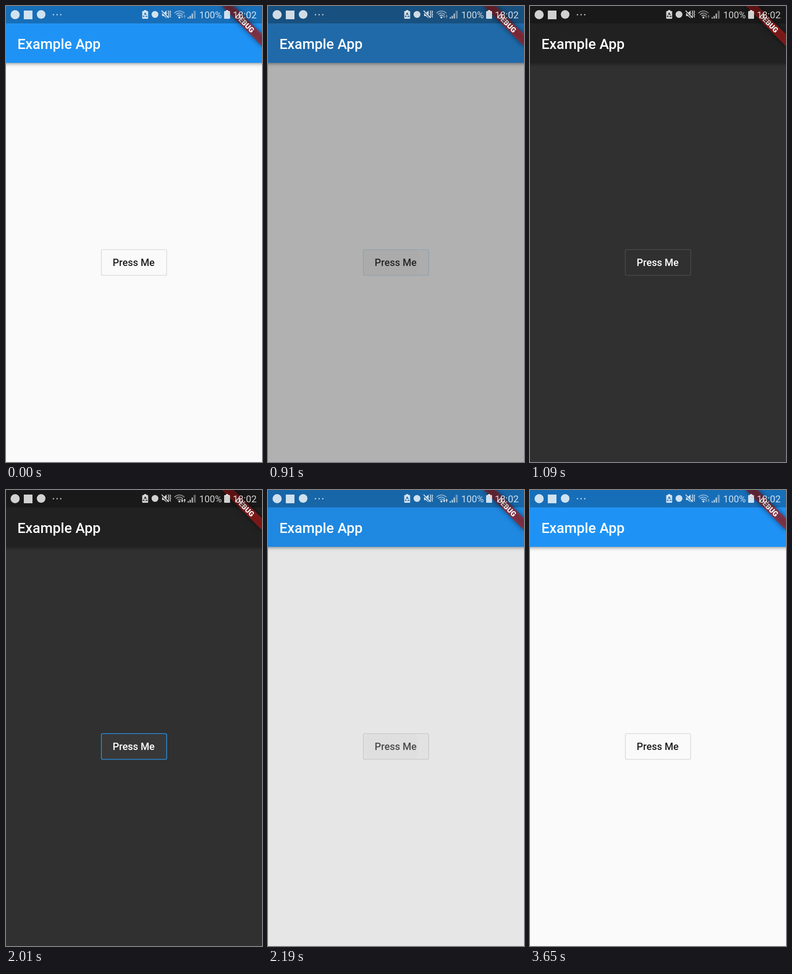
Write an HTML page with a canvas that moves like this. It is 561 px wide and 998 px high and loops after 4750 ms.

```html
<!DOCTYPE html>
<html lang="en">
<head>
<meta charset="utf-8">
<title>Theme toggle</title>
<style>
  html, body { margin: 0; width: 100%; height: 100%; overflow: hidden; background: #fafafa; }
  canvas { display: block; width: 100vw; height: 100vh; }
</style>
</head>
<body>
<canvas id="stage" width="561" height="998"></canvas>
<script>
const W = 561, H = 998, LOOP = 4750;
const ctx = document.getElementById('stage').getContext('2d');

// The screen is only refreshed at these moments.
const TICKS = [0, 640, 730, 820, 910, 1000, 1090, 1190, 1280, 1640,
  1910, 2010, 2100, 2190, 2280, 2370, 3650];
const PRESSES = [
  { down: 590, splash: 700, up: 800 },
  { down: 1870, splash: 1990, up: 2010 }
];
const LIGHT = { page: [250, 250, 250], bar: [31, 147, 245] };
const DARK = { page: [48, 48, 48], bar: [33, 33, 33] };
const BUTTON = { x: 208.8, y: 533.2, w: 143.4, h: 56.3, r: 3.2 };

const clamp = v => Math.max(0, Math.min(1, v));
const lerp = (a, b, f) => a + (b - a) * f;
const mix = (a, b, f) => a.map((v, i) => lerp(v, b[i], f));
const rgba = (c, a = 1) => `rgba(${c.map(Math.round).join(',')},${a})`;
const grey = (v, a = 1) => rgba([v, v, v], a);

function rect(x, y, w, h, color) {
  ctx.fillStyle = color;
  ctx.fillRect(x, y, w, h);
}

function disc(x, y, r, color) {
  ctx.fillStyle = color;
  ctx.beginPath();
  ctx.arc(x, y, r, 0, 7);
  ctx.fill();
}

function poly(points, color) {
  ctx.fillStyle = color;
  ctx.beginPath();
  points.forEach(([x, y]) => ctx.lineTo(x, y));
  ctx.closePath();
  ctx.fill();
}

function line(points, color, width) {
  ctx.strokeStyle = color;
  ctx.lineWidth = width;
  ctx.beginPath();
  points.forEach(([x, y]) => ctx.lineTo(x, y));
  ctx.stroke();
}

function text(label, x, y, size, weight, color, align = 'left') {
  ctx.font = `${weight} ${size}px Roboto, sans-serif`;
  ctx.textAlign = align;
  ctx.fillStyle = color;
  ctx.fillText(label, x, y);
}

function buttonPath() {
  ctx.beginPath();
  ctx.roundRect(BUTTON.x, BUTTON.y, BUTTON.w, BUTTON.h, BUTTON.r);
}

function drawAppBar(color) {
  ctx.save();
  ctx.shadowColor = 'rgba(0,0,0,.36)';
  ctx.shadowBlur = 7;
  ctx.shadowOffsetY = 2;
  rect(-20, 0, W + 40, 124.5, rgba(color));
  ctx.restore();
  text('Example App', 25, 93.5, 31.17, 500, '#fff');
}

function drawButton(t, dark) {
  const ink = 255 * dark;
  let border = 0;
  ctx.save();
  buttonPath();
  ctx.clip();
  for (const p of PRESSES) {
    const on = clamp((t - p.down) / 150);
    const fill = on * (1 - clamp((t - p.up) / 220));
    border += on * (1 - clamp((t - p.up) / 130));
    if (!fill) continue;
    rect(BUTTON.x, BUTTON.y, BUTTON.w, BUTTON.h, grey(ink, fill * lerp(.12, .04, dark)));
    if (t > p.splash) disc(270, 561, (t - p.splash) * .3, grey(ink, fill * .06));
  }
  ctx.restore();

  buttonPath();
  ctx.lineWidth = 1.6;
  ctx.strokeStyle = grey(ink, .13);
  ctx.stroke();
  ctx.strokeStyle = rgba([33, 150, 243], border);
  ctx.stroke();

  const tone = Math.pow(dark, 2.5);
  // The label lags behind the page in both directions.
  const label = t < 1500 ? tone : 1 - Math.pow(1 - dark, 2.5);
  text('Press Me', 279.8, 569, 21.82, 500, grey(255 * label, lerp(.87, 1, label)), 'center');
}

function drawRibbon() {
  const far = 2000;
  ctx.save();
  ctx.translate(W - far, 0);
  ctx.rotate(Math.PI / 4);
  ctx.shadowColor = 'rgba(0,0,0,.5)';
  ctx.shadowBlur = 12;
  ctx.shadowOffsetX = far;
  rect(-62.3, 43.6, 124.6, 18.7, '#000');
  ctx.restore();

  ctx.save();
  ctx.translate(W, 0);
  ctx.rotate(Math.PI / 4);
  rect(-62.3, 43.6, 124.6, 18.7, 'rgba(183,28,28,.627)');
  text('DEBUG', 0, 58.7, 15.9, 900, '#fff', 'center');
  ctx.restore();
}

function drawBattery(x, color) {
  rect(x + 4, 9, 5, 3, color);
  ctx.beginPath();
  ctx.roundRect(x, 11, 13, 17, 1.5);
  ctx.fill();
}

function drawMute(color, back) {
  poly([[342, 15], [346, 15], [352, 10], [352, 27], [346, 22], [342, 22]], color);
  line([[340, 10], [356, 27]], back, 4);
  line([[341, 10], [356, 26]], color, 2);
  for (const x of [355, 359]) {
    line([[x, 10], [x + 2, 13], [x, 16], [x + 2, 19], [x, 22], [x + 2, 25]], color, 1.6);
  }
}

function drawWifi(t) {
  const weak = t >= 1640 && t < 3650;
  [[5.5, weak ? .5 : .7], [10, .55], [14.5, .5]].forEach(([r, alpha]) => {
    ctx.beginPath();
    ctx.arc(380, 25.5, r, -Math.PI * .77, -Math.PI * .23);
    ctx.lineWidth = 2;
    ctx.strokeStyle = grey(255, alpha);
    ctx.stroke();
  });
  disc(380, 25, 2.3, grey(255, .75));

  const arrow = grey(255, t >= 1190 && t < 2370 ? .85 : .35);
  rect(385.3, 19, 1.6, 5, arrow);
  poly([[383.5, 23], [388.7, 23], [386.1, 27]], arrow);
  rect(390.6, 22, 1.6, 5, arrow);
  poly([[388.8, 23], [394, 23], [391.4, 19]], arrow);
}

function drawStatusBar(t, barColor) {
  const icon = grey(255, .8);
  const back = rgba(barColor.map(v => v * .75));
  rect(0, 0, W, 38, 'rgba(0,0,0,.25)');

  disc(20, 19, 10, icon);
  rect(39, 10, 19, 19, icon);
  disc(77, 18.5, 9.5, icon);
  [104, 112, 120].forEach(x => disc(x, 19, 1.5, icon));

  drawBattery(298.5, icon);
  ctx.beginPath();
  [[305, 15.5], [309, 23], [301, 23]].forEach(p => ctx.lineTo(...p));
  ctx.closePath();
  ctx.setLineDash([5, 2]);
  ctx.lineWidth = 1.7;
  ctx.strokeStyle = back;
  ctx.stroke();
  ctx.setLineDash([]);

  disc(326.5, 18.5, 7.5, icon);
  drawMute(icon, back);
  drawWifi(t);
  [3, 6, 11, 17].forEach((h, i) =>
    rect(398 + i * 4.4, 27.5 - h, i < 3 ? 2.6 : 4.6, h, grey(255, i < 3 ? .75 : .33)));

  text('100%', 423.5, 27.2, 20.4, 400, icon);
  drawBattery(478, icon);
  text('18:02', 497, 27.2, 21, 400, icon);
}

function draw(t) {
  const dark = clamp((t - 838) / 200) - clamp((t - 2010) / 200);
  const bar = mix(LIGHT.bar, DARK.bar, dark);
  rect(0, 0, W, H, rgba(mix(LIGHT.page, DARK.page, dark)));
  drawAppBar(bar);
  drawButton(t, dark);
  drawRibbon();
  drawStatusBar(t, bar);
}

const start = performance.now();
function loop() {
  const now = (performance.now() - start) % LOOP;
  draw(TICKS.filter(tick => tick <= now).pop());
  requestAnimationFrame(loop);
}
loop();
</script>
</body>
</html>
```
